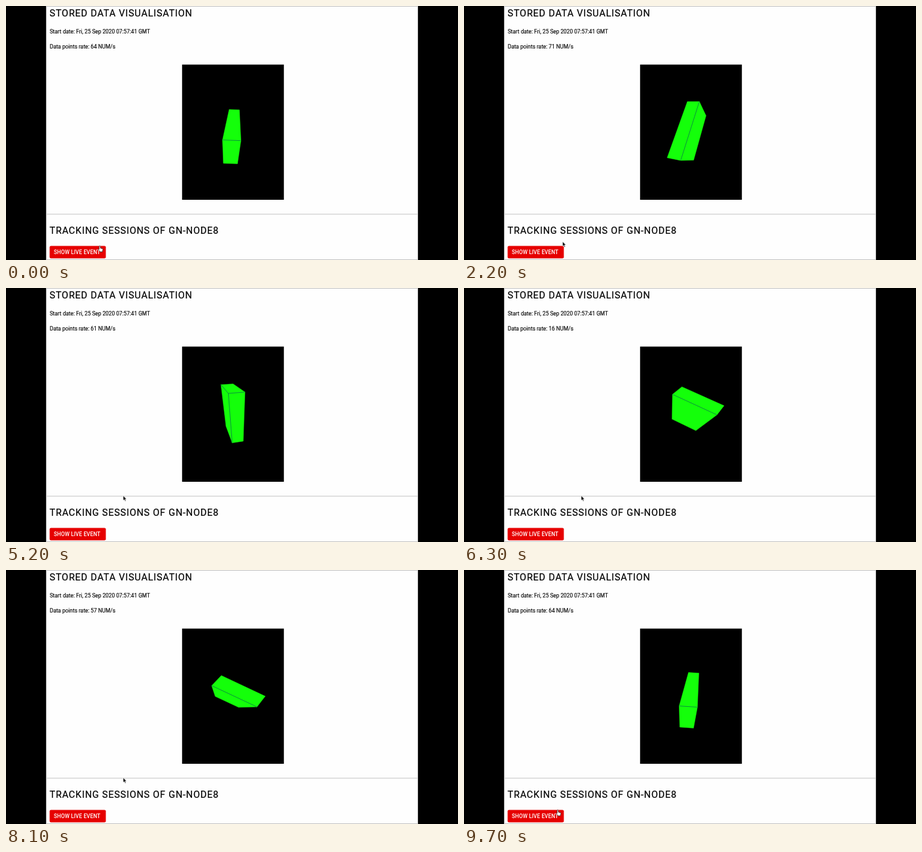
Animation, 690 px wide and 388 px high, one loop 9800 ms. Source, as an HTML page:

```html
<!DOCTYPE html>
<html lang="en">
<head>
<meta charset="utf-8">
<title>Stored data visualisation</title>
<style>
  html, body { margin: 0; width: 100%; height: 100%; overflow: hidden; background: #000; }
  svg { display: block; width: 690px; height: 388px; }
  text { font-family: Roboto, Arial, sans-serif; font-size: 8.3px; fill: #000; stroke: #000; stroke-width: .12; white-space: pre; }
  .heading { font-size: 14.5px; letter-spacing: .78px; stroke-width: .2; }
  .label { font-size: 8.2px; font-weight: 500; letter-spacing: .1px; fill: #fff; stroke: none; }
  .rule { stroke: #c4c4c4; }
  #solid { fill: #14ff0a; stroke: #14ff0a; stroke-width: .5; stroke-linejoin: round; }
  #seams { stroke: #087a4a; stroke-width: .8; }
</style>
</head>
<body>
<svg viewBox="0 0 690 388">
  <rect width="690" height="388"/>
  <rect x="61.3" width="567.5" height="388" fill="#fefefe"/>
  <path class="rule" d="M61 .5H629M61 318H629M61 387.5H629"/>

  <text class="heading" x="66.5" y="15.5">STORED DATA VISUALISATION</text>
  <text x="66.7" y="41.8">Start date: Fri, 25 Sep 2020 07:57:41 GMT</text>
  <text x="66.7" y="64.6" id="rate"></text>
  <text class="heading" x="66.5" y="348.2">TRACKING SESSIONS OF GN-NODE8</text>

  <rect x="66.6" y="366.6" width="85.8" height="18.8" rx="2" fill="#e60000"/>
  <text class="label" x="73" y="379">SHOW LIVE EVENT</text>

  <rect x="268.8" y="89.5" width="155.4" height="206.5"/>
  <path id="solid"/>
  <path id="seams"/>

  <path id="arrow" d="M0 0V7L1.7 5.6 2.9 8.2 4 7.7 2.9 5.1H5Z" stroke="#fff" stroke-width=".5"/>
  <path id="hand" d="M2 0Q3 0 3 1V3.4L6.5 4.2Q7 4.5 6.8 6L6 9H2.6L.2 5.8Q0 4.8 1.2 5.2V1Q1.2 0 2 0Z"
        fill="#fff" stroke="#222" stroke-width=".7"/>
</svg>
<script>
const LOOP = 9800, STEP = 100, RATE_LEAD = 600;

// Box half sizes (thickness, width, length) and a camera whose image is stretched sideways.
const HALF = [10.2, 31.2, 61.4];
const DISTANCE = 190.5, FOCAL_X = 169, FOCAL_Y = 123.6, CENTER_X = 346, CENTER_Y = 193;

// Angles in degrees: pitch tips the long axis towards the viewer, spin turns about it.
const keys = [
  { at: 0,    lean: 2,  pitch: -53, spin: -2,  rate: 64 },
  { at: 1300, lean: 0,  pitch: -49, spin: 0,   rate: 71 },
  { at: 3100, lean: 25, pitch: 20,  spin: 35,  rate: 48 },
  { at: 5200, lean: -2, pitch: 33,  spin: -13, rate: 61 },
  { at: 6300, lean: 9,  pitch: 67,  spin: -58, rate: 16 },
  { at: 8100, lean: 7,  pitch: 82,  spin: -58, rate: 57 },
  { at: 8800, lean: 4,  pitch: -50, spin: -3,  rate: 64 }
];

const $ = id => document.getElementById(id);
const ramp = (t, from, to) => Math.min(1, Math.max(0, (t - from) / (to - from)));
const ease = k => k * k * (3 - 2 * k);

function poseAt(t) {
  const i = Math.min(keys.findLastIndex(key => key.at <= t), keys.length - 2);
  const a = keys[i], b = keys[i + 1], k = ease(ramp(t, a.at, b.at));
  return ["lean", "pitch", "spin"].map(name => (a[name] + (b[name] - a[name]) * k) * Math.PI / 180);
}

// Unit vectors of thickness, width and length; x right, y down, z away.
function boxAxes([lean, pitch, spin]) {
  const { sin, cos } = Math;
  const length = [sin(lean), -cos(lean) * cos(pitch), -cos(lean) * sin(pitch)];
  const side = [cos(lean), sin(lean) * cos(pitch), sin(lean) * sin(pitch)];
  const front = [0, sin(pitch), -cos(pitch)];
  const thickness = side.map((v, n) => v * cos(spin) + front[n] * sin(spin));
  const width = side.map((v, n) => front[n] * cos(spin) - v * sin(spin));
  return [thickness, width, length];
}

function drawBox(pose) {
  const axes = boxAxes(pose);
  const corner = signs => {
    const [x, y, z] = [0, 1, 2].map(n => axes.reduce((sum, axis, a) => sum + signs[a] * HALF[a] * axis[n], 0));
    const depth = DISTANCE + z;
    return `${(CENTER_X + FOCAL_X * x / depth).toFixed(2)} ${(CENTER_Y + FOCAL_Y * y / depth).toFixed(2)}`;
  };
  const signsOf = entries => {
    const signs = [];
    for (const [axis, sign] of entries) signs[axis] = sign;
    return signs;
  };

  const visible = [0, 1, 2]
    .filter(a => Math.abs(axes[a][2]) * DISTANCE > HALF[a])
    .map(a => [a, -Math.sign(axes[a][2])]);

  const faces = visible.map(([a, sign]) => {
    const [b, c] = [(a + 1) % 3, (a + 2) % 3];
    const ring = [[-1, -1], [1, -1], [1, 1], [-1, 1]];
    return "M" + ring.map(([u, v]) => corner(signsOf([[a, sign], [b, u], [c, v]]))).join("L") + "Z";
  });

  // Every two visible faces share one edge, along the remaining axis.
  const seams = visible.flatMap((face, i) => visible.slice(i + 1).map(other => {
    const rest = 3 - face[0] - other[0];
    return "M" + [-1, 1].map(end => corner(signsOf([face, other, [rest, end]]))).join("L");
  }));

  $("solid").setAttribute("d", faces.join(""));
  $("solid").setAttribute("fill-rule", "nonzero");
  $("seams").setAttribute("d", seams.join(""));
}

function drawCursor(t) {
  const leave = ramp(t, 100, 600), away = ramp(t, 3700, 4100), back = ramp(t, 9000, 9500);
  const x = 141 + 9.5 * leave + 28.5 * away - 38 * back;
  const y = 366.5 - 6.5 * leave - 42.5 * away + 49 * back;
  const shown = y > 365 ? "hand" : "arrow";
  for (const id of ["hand", "arrow"]) {
    $(id).setAttribute("transform", `translate(${x} ${y})`);
    $(id).setAttribute("visibility", id === shown ? "visible" : "hidden");
  }
}

function render(now) {
  const t = Math.floor((now % LOOP) / STEP) * STEP;
  const { rate } = keys.findLast(key => key.at <= t + RATE_LEAD);
  $("rate").textContent = `Data points rate: ${rate} NUM/s`;
  drawBox(poseAt(t));
  drawCursor(t);
}

const start = performance.now();
function tick() {
  render(performance.now() - start);
  requestAnimationFrame(tick);
}
tick();
</script>
</body>
</html>
```
